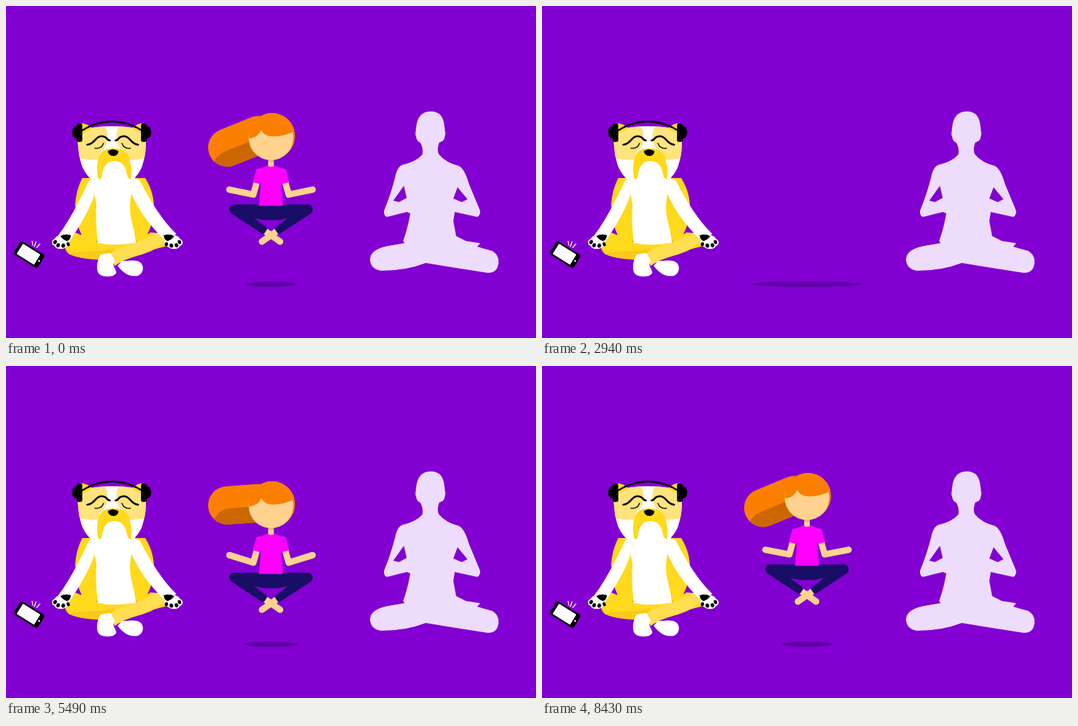
These frames come from a looping animation (750 px wide and 469 px high, 8.46 s). An HTML page with a canvas:

```html
<!DOCTYPE html>
<html lang="en">
<head>
<meta charset="utf-8">
<title>Meditation</title>
<style>
html, body { margin: 0; width: 750px; height: 469px; overflow: hidden; background: #8200d2; }
canvas { display: block; }
</style>
</head>
<body>
<canvas id="stage" width="750" height="469"></canvas>
<script>
const ctx = document.getElementById('stage').getContext('2d');
const LOOP = 8460, TAU = Math.PI * 2, DEG = Math.PI / 180;
const BG = '#8200d2', SKIN = '#ffd38f', HAIR = '#fa7f00', HAIR_DARK = '#cc6600';
const PANTS = '#190e66', SHIRT = '#ff00ff', YELLOW = '#ffd91c', PALE = '#ffe37c';

const mix = (a, b, k) => a + (b - a) * k;
const ease = k => { k = Math.min(1, Math.max(0, k)); return k * k * (3 - 2 * k); };
const ramp = (t, a, b) => ease((t - a) / (b - a));

// Eased interpolation through [time, value] keys
function track(t, ...keys) {
  let v = keys[0][1];
  for (let i = 1; i < keys.length; i++)
    v = mix(v, keys[i][1], ramp(t, keys[i - 1][0], keys[i][0]));
  return v;
}

function fill(shape, color) {
  ctx.fillStyle = color;
  ctx.fill(typeof shape === 'string' ? new Path2D(shape) : shape);
}
function line(shape, color, width, cap = 'round') {
  ctx.strokeStyle = color;
  ctx.lineWidth = width;
  ctx.lineCap = cap;
  ctx.lineJoin = 'round';
  ctx.stroke(typeof shape === 'string' ? new Path2D(shape) : shape);
}
function oval(x, y, rx, ry, color, turn = 0) {
  const p = new Path2D();
  p.ellipse(x, y, rx, ry, turn, 0, TAU);
  fill(p, color);
}
function clipped(shape, draw) {
  ctx.save();
  ctx.clip(shape);
  draw();
  ctx.restore();
}
// Outline wrapped around two circles
function capsule(x1, y1, r1, x2, y2, r2) {
  const p = new Path2D(), a = Math.atan2(y2 - y1, x2 - x1);
  const b = Math.acos(Math.max(-1, Math.min(1, (r1 - r2) / Math.hypot(x2 - x1, y2 - y1))));
  p.arc(x1, y1, r1, a + b, a - b + TAU);
  p.arc(x2, y2, r2, a - b, a + b);
  p.closePath();
  return p;
}
// Draws once as is and once mirrored about x
function mirrored(x, draw) {
  draw();
  ctx.save();
  ctx.translate(2 * x, 0);
  ctx.scale(-1, 1);
  draw();
  ctx.restore();
}

function phone() {
  ctx.save();
  ctx.translate(32.7, 351.2);
  ctx.rotate(32 * DEG);
  const body = new Path2D(), screen = new Path2D();
  body.roundRect(-20, -11, 40, 22, 4);
  screen.roundRect(-15.5, -8.5, 29, 17, 1);
  fill(body, '#000');
  fill(screen, '#fff');
  oval(16.7, 0, 1.3, 1.3, '#fff');
  ctx.restore();
  line('M37 332L38 338M42.5 333L40 340M48 336L43.5 341', '#fff', 1.2);
}

function paw() {
  oval(79, 333, 12, 10, '#fff', -0.3);
  oval(70, 334, 5, 5, '#fff');
  oval(76, 338, 7, 5, '#fff');
  fill('M77 325Q84 321 92 324Q91 331 86 332Q80 330 77 325Z', '#000');
  oval(69.5, 333.5, 2.4, 3, '#000', 0.5);
  oval(73.8, 338, 2.5, 3, '#000', 0.4);
  oval(81, 338.5, 2.6, 3, '#000', 0.2);
  oval(88, 336.5, 2.2, 3, '#000', -0.3);
}

function dog() {
  fill('M108 243C94 270 94 304 112 332H194C214 304 214 270 197 243Z', YELLOW);
  fill('M98 320C84 326 78 342 90 351C106 358 130 357 150 359L228 339C226 326 216 319 204 320L184 333H130Z', YELLOW);
  fill('M90 350C106 344 134 349 151 342L165 354L146 360C122 357 104 358 90 350Z', '#f9c91c');
  fill('M214 320C188 336 162 337 145 352L154 367C178 350 204 354 226 332Q225 322 214 320Z', '#ffdf4f');
  fill('M134 351C128 360 127 374 132 379C140 384 153 383 156 377C156 371 149 367 154 360L148 349Z', '#fff');
  fill('M164 360C174 361 184 357 191 363C196 369 194 378 187 381C177 383 168 380 158 367Z', '#fff');
  fill('M120 238H184C178 262 172 280 178 304Q182 320 184 334Q158 340 130 335Q126 304 128 280Z', '#fff');
  fill('M118 246C106 270 94 297 74 324L91 331C103 312 118 290 126 264L140 240Z', '#fff');
  fill('M189 246C201 268 215 296 241 322L226 331C208 316 188 290 177 264L165 240Z', '#fff');
  mirrored(157.5, paw);
  const head = new Path2D('M103 166Q114 165 121 172Q150 167 180 172Q186 165 196 166Q201 200 194 222C189 242 172 255 150 256C128 255 112 242 106 222Q99 198 103 166Z');
  clipped(head, () => {
    fill(head, '#fff');
    mirrored(150, () => {
      fill('M98 160H122L140 170Q148 186 140 199Q132 206 130 217Q114 218 98 214Z', PALE);
      fill('M98 160H113L120 174L107 181L101 196Z', YELLOW);
    });
  });
  fill('M152 201C141 201 132 205 130 218Q127 233 131 245Q136 245 136 238C138 225 144 219 153 219C163 219 169 225 171 237Q172 245 177 244Q179 230 175 217C172 205 163 201 152 201Z', YELLOW);
  fill('M144 205Q151 200 159 205Q159 211 152 212Q145 211 144 205Z', '#000');
  mirrored(151, () => {
    line('M115 196C126 195 126 184 135 184S142 190 147 190', '#000', 2.7);
    line('M126 201Q135 202 138 194', '#000', 1.4);
  });
  line('M104 178Q150 148 196 178', '#000', 2.4);
  mirrored(149.5, () => {
    oval(100, 178.5, 6.5, 9, '#000');
    const cup = new Path2D();
    cup.roundRect(100, 166, 8, 26, 3);
    fill(cup, '#000');
  });
}

function silhouette() {
  const c = '#eddcfb';
  fill('M601 149C588 149 581 157 580 176Q578 180 582 190L587 194Q591 204 589 210Q580 220 562 224Q554 226 551 240Q546 262 535 289Q534 296 539 298L567 291L572 293Q569 312 562 332L564 335L546 338Q516 342 515 358Q516 372 531 374Q566 374 594 363Q642 371 682 377Q693 377 696 368Q700 353 688 346L667 340L671 335L651 332L637 325L633 304L635 291L667 298Q673 294 670 287L655 251Q649 230 641 226Q622 221 613 210Q609 205 613 193L619 190Q623 182 621 175C620 156 614 149 601 149Z', c);
  fill('M563 254L548 275L556 277L567 271Z', BG);
  fill('M639 256L633 272L645 277L653 273Z', BG);
}

// Head height, pose and hair of the girl at time t; x = 0 is her axis
function girlState(t) {
  const phase = TAU * ((t < 2400 ? t + LOOP : t) - 8370) / 1800;
  const low = (1 - Math.cos(phase)) / 2;
  const floatY = 151 + 13 * low;
  const acting = t < 2400 ? ramp(t, 900, 1530) : 1 - ramp(t, 3360, 4300);
  let y = mix(floatY, 70, acting);
  if (t > 1530 && t < 3360) {
    const dt = t < 2450 ? t - 1530 : 3360 - t;
    y = 70 + 0.0022 * dt * dt;
  }
  const stand = t < 2400 ? ramp(t, 1000, 1400) : 1 - ramp(t, 3500, 4200);
  const tailMix = t < 2400 ? ramp(t, 900, 1100) : 1 - ramp(t, 4050, 4350);
  const down = t < 2400 ? ramp(t, 1000, 1450) : 1 - ramp(t, 3100, 3500);
  const tailY = track(t, [900, 42], [1200, 62], [1530, 30], [1680, -2], [2400, -2],
    [2700, 65], [3150, 62], [3360, 30], [3530, 0], [3750, 2], [4150, 52]);
  const tailX = track(t, [1400, -62], [1700, -46], [2700, -46], [3000, -52], [3500, -66], [4200, -62]);
  return {
    y, stand, down, tailX,
    tailY: mix(42.5 + 8.5 * Math.cos(phase + 25 * DEG), tailY, tailMix),
    handY: 108 + 4.5 * Math.cos(phase + 72 * DEG),
    shadow: t < 900 || t > 4300 ? 35 + 4.5 * low
      : track(t, [900, 39], [1450, 35], [1700, 80], [1950, 80], [2430, 0],
          [2730, 0], [2960, 80], [3180, 80], [3500, 35], [3900, 35], [4300, 37])
  };
}

function leg(stand) {
  const a = 95 * DEG * (1 - stand), b = DEG * mix(55, -1, stand);
  const kx = -9 - 43 * Math.sin(a), ky = 140 + 43 * Math.cos(a);
  const at = d => [kx + d * Math.sin(b), ky + d * Math.cos(b)];
  const [ax, ay] = at(50), [sx, sy] = at(54), [fx, fy] = at(79);
  fill(capsule(kx, ky, 7, ax, ay, 5.5), PANTS);
  fill(capsule(-9, 140, mix(11, 9.5, stand), kx, ky, 7), PANTS);
  line(`M${sx} ${sy}L${fx} ${fy}`, SKIN, 9, 'butt');
  oval(fx, fy, 4.5, 4.5, SKIN);
}

function arm(g) {
  const pose = (sit, wide, low) => mix(mix(sit, wide, g.stand), low, g.down);
  const ex = pose(-25, -31, -23), ey = pose(115, 108.5, 110);
  const hx = pose(-59, -67, -36), hy = pose(g.handY, 108.5, 146);
  line(`M-16 83L${ex} ${ey}L${hx} ${hy}`, SKIN, 9);
  line(`M-15 80L${mix(-16, ex, 0.5)} ${mix(83, ey, 0.5)}`, SHIRT, 11, 'butt');
}

function girl(g) {
  ctx.save();
  ctx.beginPath();
  ctx.rect(0, 0, 750, 396.5);
  ctx.clip();
  ctx.translate(375, g.y);

  const tail = capsule(g.tailX, g.tailY, 27, -18, 31, 27);
  fill(tail, HAIR);
  clipped(tail, () => {
    ctx.translate(6, 31);
    fill(tail, HAIR_DARK);
  });

  mirrored(0, () => leg(g.stand));
  const hip = mix(11, 9.5, g.stand);
  fill(capsule(-9, 140, hip, 9, 140, hip), PANTS);
  mirrored(0, () => arm(g));
  fill('M-4 62H4V76Q0 80 -4 76Z', SKIN);
  fill('M-4 65H4V69Q0 70 -4 68Z', '#e6b070');
  fill('M-5 74Q0 78 5 74L17 79Q20 82 20 88L14 96L17 131H-17L-14 96L-20 88Q-20 82 -17 79Z', SHIRT);

  const hair = new Path2D();
  hair.arc(1.5, 32.5, 32.5, 0, TAU);
  fill(hair, HAIR);
  oval(0, 35, 31.5, 31.5, SKIN);
  clipped(hair, () => fill('M-34 36Q-19 36 -14 24Q-9 33 3 33Q20 33 36 24V-2H-34Z', HAIR));
  ctx.restore();
}

function frame(now) {
  const t = now % LOOP, g = girlState(t);
  ctx.fillStyle = BG;
  ctx.fillRect(0, 0, 750, 469);
  phone();
  dog();
  silhouette();
  if (g.shadow > 0.1) oval(375, 393, g.shadow, Math.min(3.7, g.shadow / 5), '#6000a6');
  if (g.y < 440) girl(g);
  requestAnimationFrame(frame);
}
requestAnimationFrame(frame);
</script>
</body>
</html>
```
